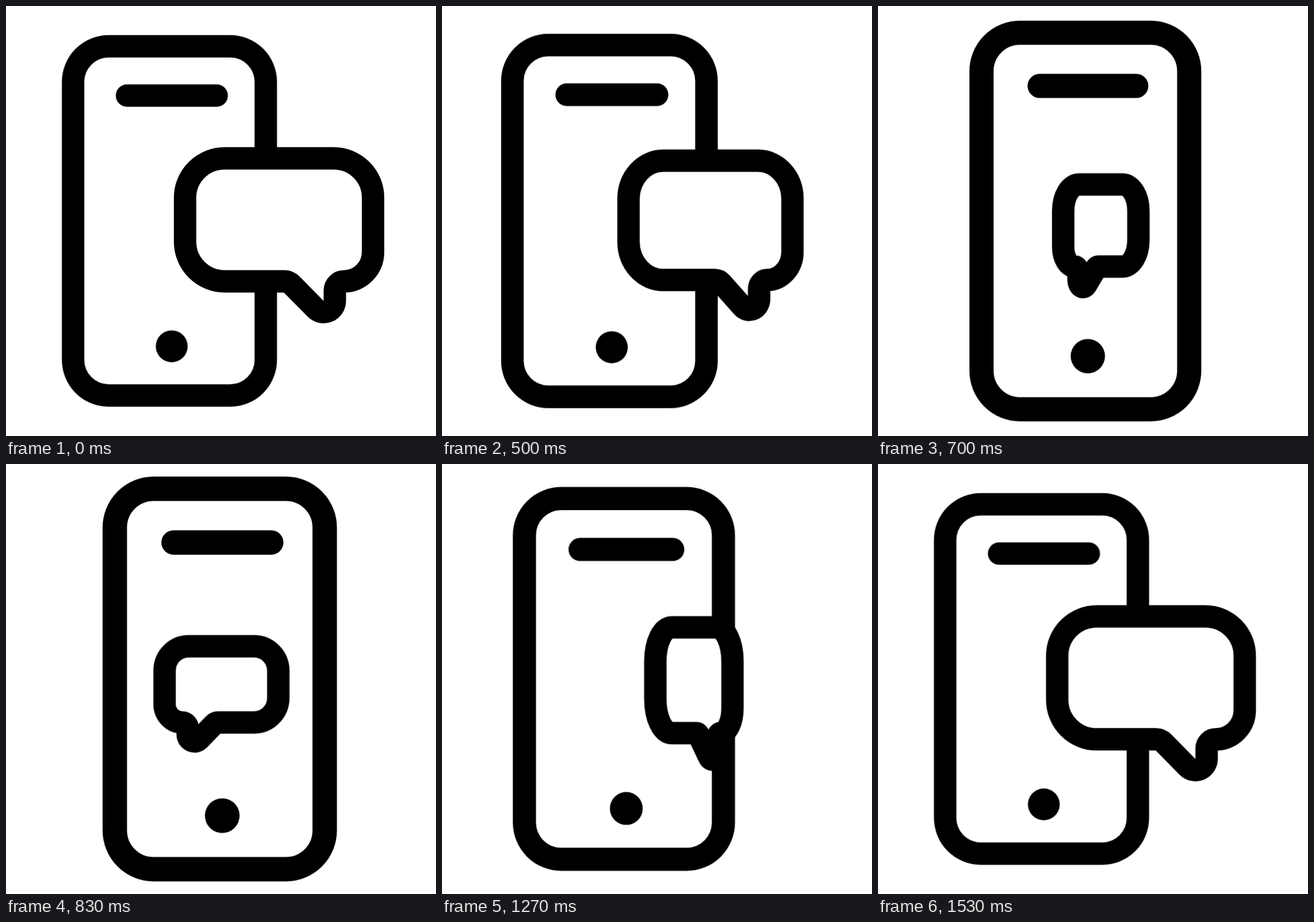
Write an HTML page without scripts that moves like this. It is 748 by 748 pixels and loops after 1.77 s.

```html
<!DOCTYPE html>
<html lang="en">
<head>
<meta charset="utf-8">
<title>Phone message</title>
<style>
  html, body { margin: 0; width: 100%; height: 100%; overflow: hidden; background: #fff; }
  svg { display: block; width: 100vw; height: 100vh; }

  .line { fill: none; stroke: #000; stroke-width: 39; stroke-linecap: round; stroke-linejoin: round; }
  .bubble { fill: #fff; vector-effect: non-scaling-stroke; }

  .phone, .bubble { transform: var(--rest); animation: swap 1770ms infinite; }
  .phone {
    --rest: translate(284.3px, 373.8px) scale(1, 1);
    --open: translate(374px, 374px) scale(1.0915, 1.0915);
  }
  .bubble {
    --rest: translate(475px, 372px) scale(1, 1);
    --open: translate(372.3px, 383.6px) scale(-.645, .609);
  }

  @keyframes swap {
    0% { transform: var(--rest); animation-timing-function: linear; }
    18.81% { transform: var(--rest); animation-timing-function: cubic-bezier(.718, 0, .137, 1); }
    54.24% { transform: var(--open); animation-timing-function: cubic-bezier(.7, 0, .238, 1); }
    88.14%, 100% { transform: var(--rest); }
  }
</style>
</head>
<body>
<svg viewBox="0 0 748 748">
  <g class="phone">
    <rect class="line" x="-167.6" y="-303.8" width="335.2" height="607.6" rx="62"/>
    <path class="line" d="M-73.8-218H82.2"/>
    <circle cx="4" cy="218.2" r="27.7"/>
  </g>
  <path class="line bubble" d="M-94.5-107H95A68.5 68.5 0 0 1 163.5-38.5V56A50.5 51 0 0 1 113 107
    A16 16 0 0 0 97 123V141A19.5 19.5 0 0 1 63.7 154.8L21.5 112A17 17 0 0 0 10 107
    H-94.5A69 69 0 0 1 -163.5 38V-38.5A69 68.5 0 0 1 -94.5-107Z"/>
</svg>
</body>
</html>
```
